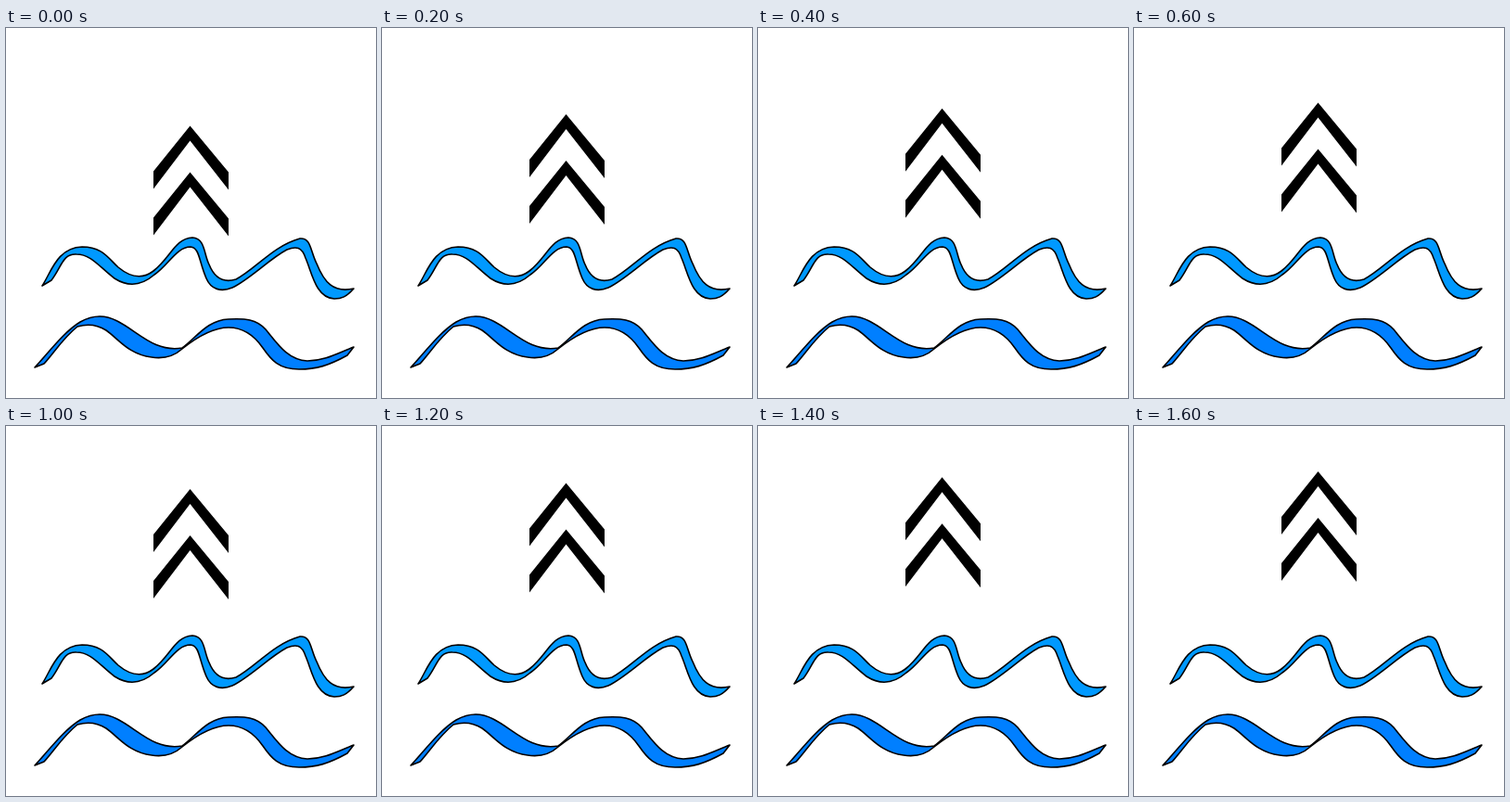
An HTML page that plays this animation: 399x399 px, repeating every 1.8 s.

```html
<!DOCTYPE html>
<html>
<head>
<meta charset="utf-8">
<style>
  html, body { margin: 0; width: 100%; height: 100%; overflow: hidden; background: #fff; }
  svg { display: block; width: 100vw; height: 100vh; }
  .wave { stroke: #000; stroke-width: 1.6; stroke-linejoin: round; }
</style>
</head>
<body>
<svg viewBox="0 0 399 399">
  <defs>
    <path id="chevron" d="M159 49 L198.5 0 L240 50 V69 L198.5 16 L159 68Z"/>
  </defs>
  <g id="arrows">
    <use href="#chevron"/>
    <use href="#chevron" y="50"/>
  </g>
  <path class="wave" fill="#0099ff" d="M39 278 C49 263 55 237 82 236 C104 236 110 248 121 258
    C133 268 146 272 159 262 C178 247 182 227 201 226 C215 227 213 243 219 255
    C225 270 235 275 248 271 C269 260 288 235 317 227 C329 226 328 240 335 254
    C343 274 353 286 375 281 C367 290 362 292 354 292 C334 291 330 264 323 248
    C319 236 313 235 303 239 C284 249 263 271 244 280 C232 285 221 282 216 270
    C208 252 209 237 199 236 C184 236 175 256 160 266 C145 279 131 279 117 270
    C101 258 92 244 76 244 C61 243 60 258 49 272Z"/>
  <path class="wave" fill="#007fff" d="M31 366 C46 350 62 328 80 317 C94 309 107 309 120 316
    C142 327 160 350 190 345 C206 333 217 315 240 314 C258 313 270 314 280 325
    C293 341 304 358 325 359 C344 359 359 350 375 344 L368 353 C348 364 335 368 316 368
    C294 368 286 358 277 345 C268 332 257 323 240 323 C222 323 205 334 190 346
    C180 355 170 357 157 355 C132 352 121 335 108 326 C97 319 87 319 77 322
    C62 334 51 351 41 362Z"/>
</svg>
<script>
  const STEP = 200, STEPS = 9, RISE = 6.27;
  const arrows = document.getElementById("arrows");

  // The first step climbs twice as far as the others.
  function draw(now) {
    const step = Math.floor(now / STEP) % STEPS;
    const y = 105.5 - RISE * (step ? step + 1 : 0);
    arrows.setAttribute("transform", `translate(0 ${y})`);
    requestAnimationFrame(draw);
  }
  draw(performance.now());
</script>
</body>
</html>
```
